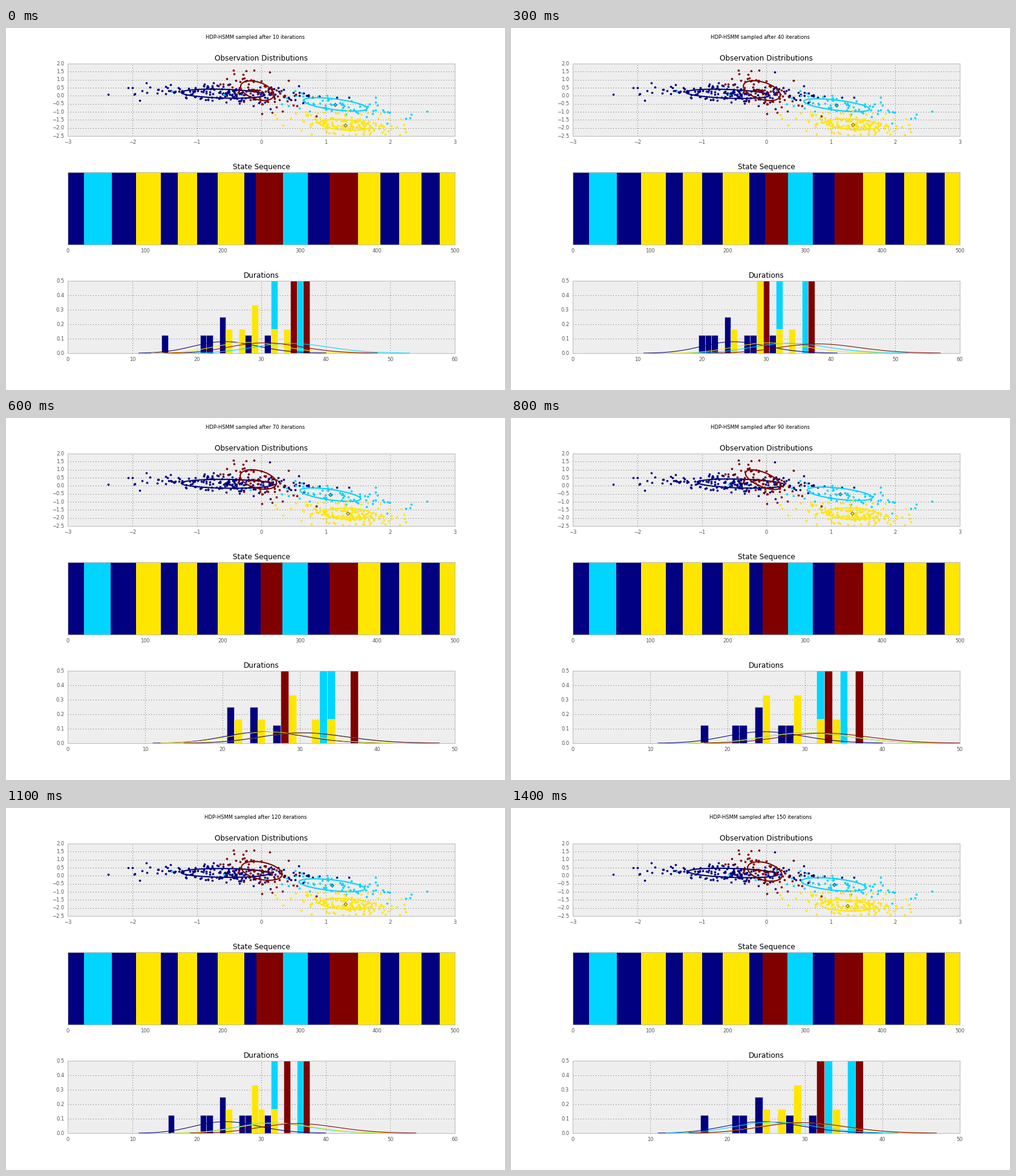
Animation, 825 px wide and 600 px high, one loop 1500 ms. Source, as a matplotlib script:

```python
import math

import matplotlib
import matplotlib.pyplot as plt
import numpy as np
from matplotlib.animation import FuncAnimation

plt.rcParams.update({
    "font.family": "DejaVu Sans", "font.size": 8,
    "axes.facecolor": "#eeeeee", "axes.edgecolor": "#bcbcbc",
    "axes.linewidth": 1, "axes.grid": True, "axes.axisbelow": True,
    "axes.titlesize": "x-large", "axes.titlepad": 5,
    "grid.color": "black", "grid.linestyle": ":", "grid.linewidth": 0.5,
    "lines.dotted_pattern": [1, 3], "lines.scale_dashes": False,
    "xtick.color": "#555555", "ytick.color": "#555555",
    "xtick.major.size": 0, "ytick.major.size": 0,
    "xtick.major.pad": 6, "ytick.major.pad": 6, "ytick.alignment": "center",
})

WIDTH, HEIGHT, DPI = 825, 600, 75
NAVY, CYAN, YELLOW, RED, SPLIT = range(5)
SPLIT_ITERATION = 30
JET = matplotlib.colormaps["jet"]
STATES = [NAVY, CYAN, NAVY, YELLOW, NAVY, YELLOW, NAVY, YELLOW, NAVY,
          RED, CYAN, NAVY, RED, YELLOW, NAVY, YELLOW, NAVY, YELLOW]

# Gaussian per state: mean x, mean y, deviation x, deviation y, correlation
GAUSSIANS = {
    NAVY: (-.52, .15, .68, .28, -.25),
    CYAN: (1.14, -.57, .47, .41, -.55),
    YELLOW: (1.33, -1.78, .4, .34, -.2),
    RED: (-.03, .3, .29, .61, -.45),
    SPLIT: (1.39, -.68, .54, .39, -.75),
}

# Sampler state at key iterations: three moving change points, the last
# duration, and the Poisson rates of cyan, yellow and red
KEYS = {
    10: (57, 243, 278, 27, 35, 28.5, 31),
    30: (55, 244, 278, 36, 30.5, 31, 37),
    40: (57, 248, 278, 29, 34, 31, 38.5),
    70: (55, 249, 277, 22, 31, 26.5, 30.8),
    100: (57, 243, 278, 26, 30.5, 33, 34),
    130: (57, 245, 278, 32, 33, 32.5, 37.2),
    150: (57, 245, 277, 27, 26.5, 29.8, 30.2),
}


def sample(iteration):
    """Return change points, states, durations and Poisson rates."""
    row = [np.interp(iteration, list(KEYS), col) for col in zip(*KEYS.values())]
    a, b, c, last = (int(round(v)) for v in row[:4])
    edges = np.array([0, 21, a, 88, 120, 142, 167, 194, 228, b, c,
                      310, 338, 375, 404, 428, 457, 481, 500])
    states = np.array(STATES)
    if iteration == SPLIT_ITERATION:
        states[1] = SPLIT
    durations = np.diff(edges)
    durations[-1] = last
    rates = dict(zip((CYAN, YELLOW, RED), row[4:]))
    for s in (NAVY, SPLIT):
        if s in states:
            rates[s] = durations[states == s].mean() + .8
    return edges, states, durations, rates


def place(gaussian, u, v):
    """Map unit coordinates onto a correlated Gaussian."""
    x, y, w, h, r = gaussian
    return x + w * u, y + h * (r * u + math.sqrt(1 - r * r) * v)


def make_observations():
    rng = np.random.default_rng(7)
    edges, states, *_ = sample(SPLIT_ITERATION)
    labels = np.repeat(states, np.diff(edges))
    points = np.zeros((len(labels), 2))
    for state, gaussian in GAUSSIANS.items():
        z = rng.normal(size=(2, np.sum(labels == state)))
        z = (z - z.mean(1, keepdims=True)) / z.std(1, keepdims=True)
        points[labels == state] = np.transpose(place(gaussian, *z))
    return points


def wobble(gaussian, rng):
    """Posterior draw around a state's Gaussian."""
    x, y, w, h, r = gaussian
    n = rng.normal(size=5)
    return (x + .1 * w * n[0], y + .1 * h * n[1],
            w * (1 + .06 * n[2]), h * (1 + .03 * n[3]), r + .08 * n[4])


def poisson(rate):
    t = np.arange(1, int(rate + 3.1 * math.sqrt(rate) + 1))
    return t, np.array([math.exp(k * math.log(rate) - rate - math.lgamma(k + 1))
                        for k in t])


POINTS = make_observations()
TURN = np.linspace(0, 2 * np.pi, 200)

fig, (obs_ax, seq_ax, dur_ax) = plt.subplots(
    3, 1, figsize=(WIDTH / DPI, HEIGHT / DPI), dpi=DPI)
# Nudged so that the frames land on whole pixels
dx, dy = -.75 / WIDTH, 1 / HEIGHT
fig.subplots_adjust(left=.125 + dx, right=.9 + dx,
                    bottom=.1 + dy, top=.9 + dy, hspace=.5)
heading = fig.suptitle("", y=.98 + dy, fontsize=8)


def draw_observations(labels, colors, rng):
    obs_ax.cla()
    for state, color in colors.items():
        obs_ax.plot(*POINTS[labels == state].T, ".", ms=6, mew=.5, color=color)
        shape = wobble(GAUSSIANS[state], rng)
        obs_ax.plot(*shape[:2], "D", ms=4, mew=.5, mec="black", color=color)
        obs_ax.plot(*place(shape, np.cos(TURN), np.sin(TURN)), lw=2, color=color)
    obs_ax.set(xlim=(-3, 3), ylim=(-2.5, 2), xticks=range(-3, 4),
               yticks=np.arange(-2.5, 2.1, .5), title="Observation Distributions")


def draw_sequence(edges, states, colors):
    seq_ax.cla()
    seq_ax.bar(edges[:-1], 1, np.diff(edges), align="edge", lw=0, snap=True,
               color=[colors[s] for s in states])
    seq_ax.set(xlim=(0, 500), ylim=(0, 1), yticks=[],
               xticks=range(0, 501, 100), title="State Sequence")


def draw_durations(states, durations, colors, rates):
    dur_ax.cla()
    top, end = .5, 0
    for state, color in colors.items():
        values, counts = np.unique(durations[states == state], return_counts=True)
        heights = counts / counts.sum()
        dur_ax.bar(values, heights, 1, color=color, ec="#eeeeee", lw=.5)
        t, pmf = poisson(rates[state])
        seen = pmf > 5e-4
        dur_ax.plot(t[seen], pmf[seen], lw=1, color=color)
        top, end = max(top, heights.max()), max(end, t[-1])
    right = 50 if end <= 50 else 60
    dur_ax.set(xlim=(0, right), ylim=(0, top), xticks=range(0, right + 1, 10),
               yticks=np.linspace(0, top, 6), title="Durations")


def update(i):
    iteration = 10 * (i + 1)
    if iteration == SPLIT_ITERATION:
        levels = {NAVY: 0, SPLIT: .25, CYAN: 1, YELLOW: .5, RED: .75}
    else:
        levels = {NAVY: 0, CYAN: 1 / 3, YELLOW: 2 / 3, RED: 1}
    colors = {s: JET(float(v)) for s, v in levels.items()}
    edges, states, durations, rates = sample(iteration)
    labels = np.repeat(states, np.diff(edges))

    heading.set_text(f"HDP-HSMM sampled after {iteration} iterations")
    draw_observations(labels, colors, np.random.default_rng(iteration))
    draw_sequence(edges, states, colors)
    draw_durations(states, durations, colors, rates)
    return []


anim = FuncAnimation(fig, update, frames=15, interval=100, repeat=True,
                     repeat_delay=0, blit=False)
plt.show()
```
